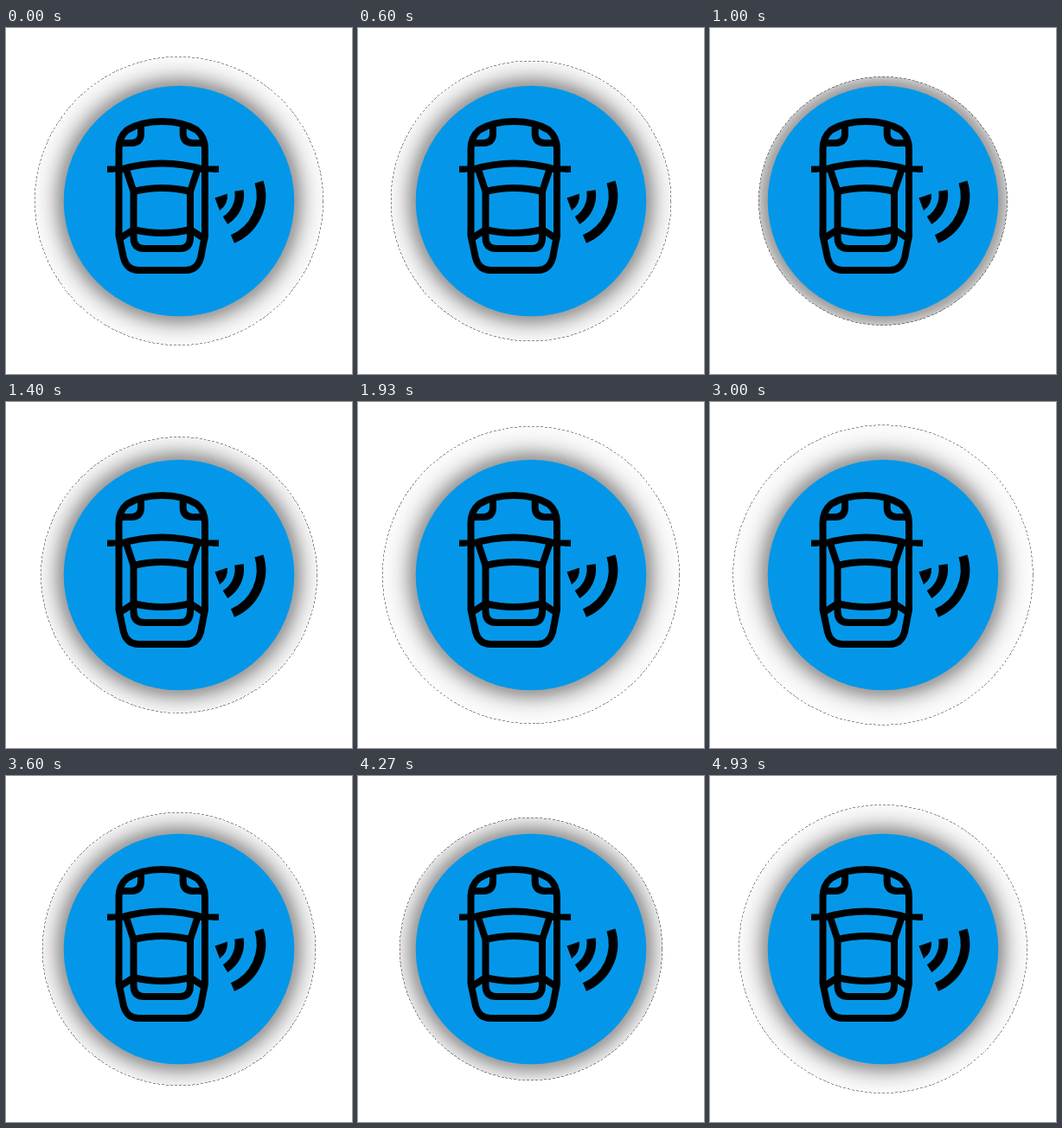
Write an HTML page that moves like this. It is 400x400 px and loops after 4.99 s.

```html
<!DOCTYPE html>
<html lang="en">
<head>
<meta charset="utf-8">
<title>Parking sensor</title>
<style>
  html, body { margin: 0; width: 100%; height: 100%; overflow: hidden; background: #fff; }
  svg { display: block; width: 100%; height: 100%; }
</style>
</head>
<body>
<svg viewBox="0 0 400 400">
  <defs>
    <radialGradient id="glow" gradientUnits="userSpaceOnUse" cx="200" cy="200" r="200"></radialGradient>
  </defs>
  <circle id="halo" cx="200" cy="200" fill="url(#glow)"/>
  <circle id="rim" cx="200" cy="200" fill="none" stroke="#000" stroke-opacity=".7" stroke-width=".6" stroke-dasharray="3 2" shape-rendering="crispEdges"/>
  <circle cx="200" cy="200" r="133.3" fill="#0497e9"/>
  <g fill="none" stroke="#000" stroke-width="8">
    <path d="M130.500 165V140Q130.500 126 140 118Q156 108 180.300 108T220.500 118Q230 126 230 140V240L225 266Q221 280 208 280H153Q140 280 136 266L130.500 240Z"/>
    <path d="M132 133H146Q156 132 156 122V110M228.500 133H215Q204.700 132 204.700 122V110"/>
    <path d="M120.500 167V163H131M242.500 167V163H230" stroke-width="7"/>
    <path d="M131 164Q180.300 149 230 164"/>
    <path d="M138.500 162L147.500 189Q180.300 181 213 189L222 162"/>
    <path d="M147.500 188V242Q147.500 255 160 255H201Q213 255 213 242V188"/>
    <path d="M132 243L147.500 233Q180.300 241 213 233L228.500 243"/>
    <g stroke-width="10.5">
      <path d="M292.500 178A54 54 0 0 1 262 244"/>
      <path d="M269.500 188A34.500 34.500 0 0 1 253.500 222.500"/>
    </g>
  </g>
  <path d="M241.500 196.500L256 191.500Q257 204 247 211Z"/>
</svg>
<script>
  const LOOP = 4990, STEPS = 75, PULSE = 22, PEAK = 4;
  const DISC = 133.3, SOFTNESS = 15, STRENGTH = 0.36, REACH = 200;
  const byId = id => document.getElementById(id);
  const halo = byId("halo"), rim = byId("rim"), glow = byId("glow");

  // The shadow stays fixed; only the circle that reveals it pulses.
  for (let distance = 0; distance <= 64; distance += 4) {
    const stop = document.createElementNS("http://www.w3.org/2000/svg", "stop");
    const falloff = Math.exp(-((distance / SOFTNESS) ** 1.5));
    stop.setAttribute("offset", (DISC + distance) / REACH);
    stop.setAttribute("stop-opacity", STRENGTH * falloff + 0.008);
    glow.appendChild(stop);
  }

  // Quick rise to the peak, slower decay after it.
  function radiusAt(step) {
    const u = (step - PEAK + PULSE) % PULSE;
    if (u < 14.5) return 190 - 6.6 * u + 0.22 * u * u;
    const v = u - PULSE;
    return 190 + 4.55 * v - 0.29 * v * v;
  }

  function draw(time) {
    const step = Math.floor((time % LOOP) / LOOP * STEPS + 0.05) % STEPS;
    const radius = radiusAt(step);
    halo.setAttribute("r", radius);
    rim.setAttribute("r", radius - 0.5);
  }

  const start = performance.now();
  function tick(now) {
    draw(Math.max(0, now - start));
    requestAnimationFrame(tick);
  }
  draw(0);
  requestAnimationFrame(tick);
</script>
</body>
</html>
```
